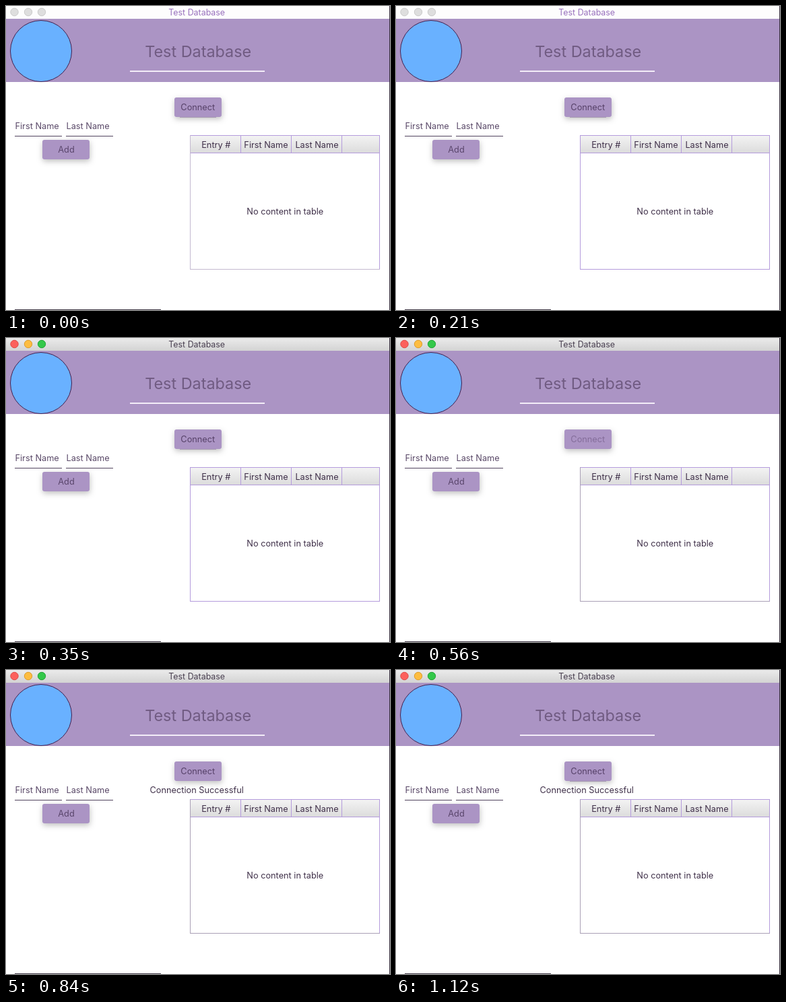
An HTML page that plays this animation: 570 px wide and 452 px high, repeating every 1190 ms.

```html
<!DOCTYPE html>
<html lang="en">
<head>
<meta charset="utf-8">
<title>Test Database</title>
<style>
  html, body { margin: 0; width: 100%; height: 100%; overflow: hidden; background: #fff; }
  svg { display: block; width: 570px; height: 452px; }
  text {
    font: 400 12.75px Inter, "Open Sans", sans-serif;
    font-optical-sizing: none;
    fill: #40314a;
  }
  .mid { text-anchor: middle; }
  .bar { font-size: 12.4px; }
  .heading { font-size: 23.4px; fill: #705b82; }
  .button { fill: #ab94c4; filter: url(#shadow); }
  .caption { fill: #5a466c; }
  .field { fill: #5b4a69; }
  .crisp { shape-rendering: crispEdges; }
</style>
</head>
<body>
<svg viewBox="0 0 570 452" xmlns="http://www.w3.org/2000/svg">
  <defs>
    <linearGradient id="chrome" x2="0" y2="1">
      <stop stop-color="#ebebeb"/><stop offset="1" stop-color="#d3d3d3"/>
    </linearGradient>
    <linearGradient id="head" x2="0" y2="1">
      <stop stop-color="#f3f3f3"/><stop offset="1" stop-color="#dcdcdc"/>
    </linearGradient>
    <filter id="shadow" x="-30%" y="-60%" width="160%" height="240%">
      <feDropShadow dx="0.5" dy="3" stdDeviation="4" flood-color="#000" flood-opacity="0.25"/>
    </filter>
  </defs>

  <rect width="570" height="452" fill="#fff"/>
  <rect id="idleBar" width="570" height="19" fill="#fdfdfd"/>
  <rect id="liveBar" width="570" height="19" fill="url(#chrome)"/>
  <g id="lights" stroke-width="1">
    <circle cx="12.5" cy="9" r="5.7"/>
    <circle cx="33" cy="9" r="5.7"/>
    <circle cx="53" cy="9" r="5.7"/>
  </g>
  <text id="barText" class="mid bar" x="283.2" y="14">Test Database</text>

  <rect class="crisp" y="19" width="570" height="94" fill="#ab94c4"/>
  <circle cx="52" cy="67" r="45.5" fill="#69b1ff" stroke="#43204f" stroke-width="1"/>
  <text class="mid heading" x="285.2" y="76">Test Database</text>
  <rect class="crisp" x="184" y="96" width="200" height="2" fill="#f3edf8"/>

  <rect class="button" x="250" y="136" width="70" height="29" rx="3"/>
  <rect id="edge" class="crisp" x="258" y="165" width="54" height="1" fill="#a599b0"/>
  <text id="connect" class="mid" x="284.8" y="155">Connect</text>
  <text id="status" x="213.5" y="183">Connection Successful</text>

  <text class="field" x="13.5" y="183">First Name</text>
  <text class="field" x="89.5" y="183">Last Name</text>
  <g class="crisp" fill="#51435d">
    <rect x="13" y="193" width="70" height="1"/>
    <rect x="89" y="193" width="70" height="1"/>
  </g>
  <rect class="button" x="54" y="199" width="70" height="29" rx="3"/>
  <text class="mid caption" x="89.5" y="218">Add</text>

  <g class="crisp">
    <rect x="274" y="193" width="280" height="25" fill="url(#head)"/>
    <g fill="#b49bdc">
      <rect x="273" y="192" width="282" height="1"/>
      <rect x="273" y="218" width="282" height="1"/>
      <rect x="348" y="193" width="1" height="25"/>
      <rect x="423" y="193" width="1" height="25"/>
      <rect x="498" y="193" width="1" height="25"/>
      <rect x="554" y="192" width="1" height="200"/>
    </g>
    <path id="frame" d="M273.5 192V391.5H555" fill="none"/>
  </g>
  <text class="mid" x="311.8" y="211">Entry #</text>
  <text class="mid" x="386" y="211">First Name</text>
  <text class="mid" x="461.5" y="211">Last Name</text>
  <text class="mid" x="414.3" y="310">No content in table</text>

  <rect class="crisp" x="13" y="451" width="217" height="1" fill="#443c4a"/>
  <rect class="crisp" x="569" y="0" width="1" height="452" fill="#38303f"/>
</svg>
<script>
  const LOOP = 1190, STEP = 70;
  const ACTIVE = 280, PRESS = 560, DONE = 700;
  const get = id => document.getElementById(id);
  const paint = (el, fill) => el.setAttribute('fill', fill);
  const show = (el, on) => { el.style.visibility = on ? 'visible' : 'hidden'; };

  const parts = {};
  for (const id of ['idleBar', 'liveBar', 'barText', 'connect', 'edge', 'status', 'frame']) {
    parts[id] = get(id);
  }
  const lights = [...get('lights').children];
  const lit = [['#fc615c', '#dc4a46'], ['#fdbd40', '#dc9d2e'], ['#34c84a', '#25a638']];
  const dim = ['#dedede', '#cbcbcb'];

  // The pressed caption fades back to full strength.
  function captionColor(t) {
    const k = t < PRESS ? 1 : Math.min(1, (t - PRESS) / 280);
    const mix = (a, b) => Math.round(a + (b - a) * k);
    return `rgb(${mix(132, 86)},${mix(109, 65)},${mix(154, 104)})`;
  }

  function draw(time) {
    const t = Math.floor((time % LOOP) / STEP) * STEP;
    const active = t >= ACTIVE;
    show(parts.idleBar, !active);
    show(parts.liveBar, active);
    parts.barText.style.fill = active ? '#493f50' : '#9870bd';
    lights.forEach((dot, i) => {
      const [fill, line] = active ? lit[i] : dim;
      paint(dot, fill);
      dot.setAttribute('stroke', line);
    });
    parts.connect.style.fill = captionColor(t);
    show(parts.edge, t < PRESS || t >= 1120);
    show(parts.status, t >= DONE);
    parts.frame.setAttribute('stroke', t < STEP ? '#c4b9d0' : t < PRESS ? '#b49bdc' : '#aaa0b6');
  }

  let start;
  function tick(now) {
    start ??= now;
    draw(now - start);
    requestAnimationFrame(tick);
  }
  draw(0);
  requestAnimationFrame(tick);
</script>
</body>
</html>
```
